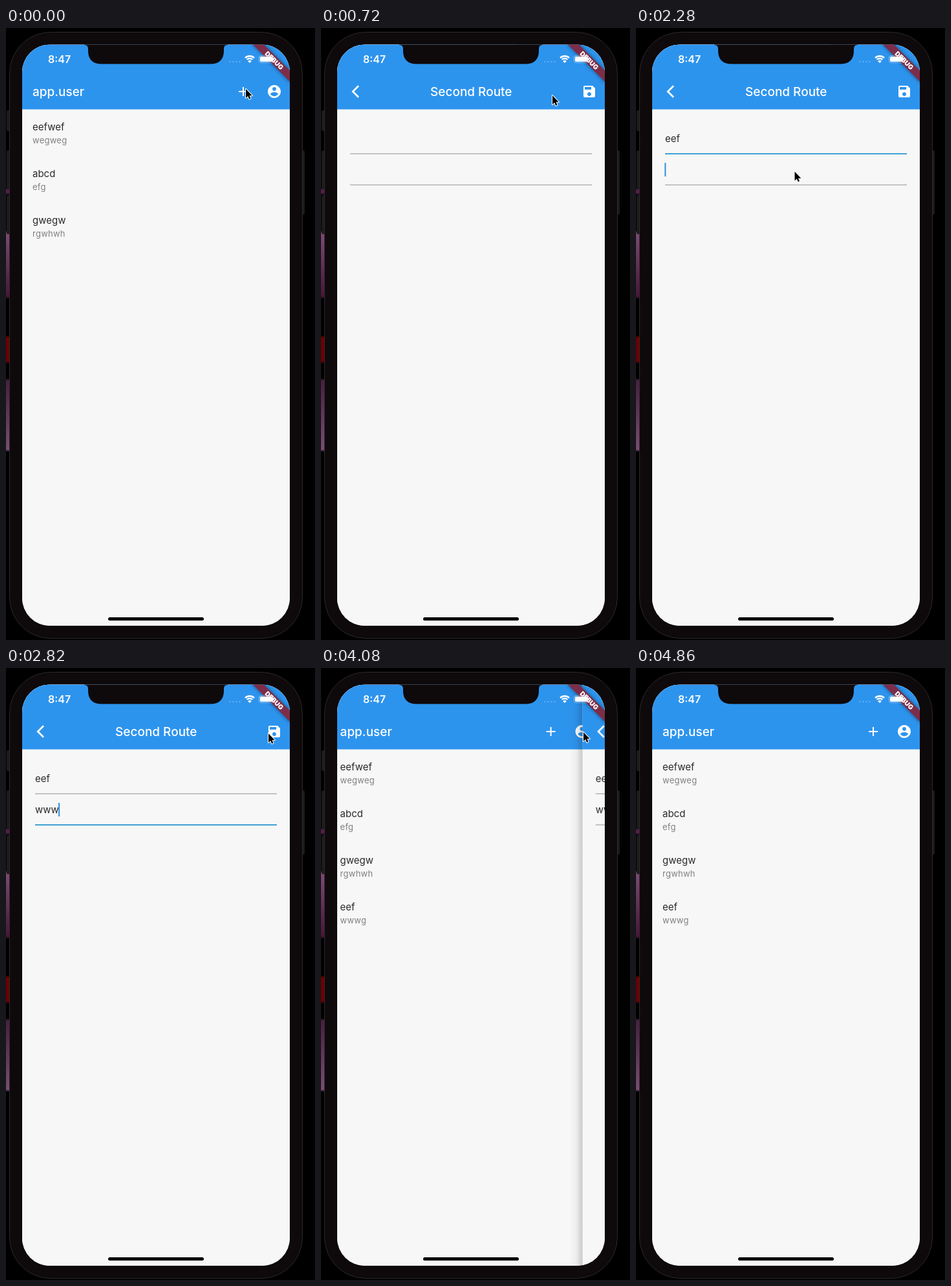
Write an HTML page with a canvas that moves like this. It is 478 px wide and 944 px high and loops after 5.16 s.

```html
<!DOCTYPE html>
<html lang="en">
<head>
<meta charset="utf-8">
<title>Phone list demo</title>
<style>
  html, body { margin: 0; width: 100%; height: 100%; overflow: hidden; background: #000; }
  canvas { display: block; }
</style>
</head>
<body>
<canvas id="stage" width="478" height="944"></canvas>
<script>
const ctx = document.getElementById('stage').getContext('2d');
const LOOP = 5160, STEP = 60;
const SCREEN = { x: 25, y: 25.5, w: 414, h: 896.5 };
const BLUE = '#2d94ee', PAGE = '#f7f7f7', BEZEL = '#0e090b';
const FONT = 'Inter, Roboto, sans-serif';

const ICONS = {
  add: new Path2D('M19 13h-6v6h-2v-6H5v-2h6V5h2v6h6z'),
  account: new Path2D('M12 2C6.48 2 2 6.48 2 12s4.48 10 10 10 10-4.48 10-10S17.52 2 12 2zm0 3c1.66 0 3 1.34 3 3s-1.34 3-3 3-3-1.34-3-3 1.34-3 3-3zm0 14.2c-2.5 0-4.71-1.28-6-3.22.03-1.99 4-3.08 6-3.08 1.99 0 5.97 1.09 6 3.08-1.29 1.94-3.5 3.22-6 3.22z'),
  save: new Path2D('M17 3H5c-1.11 0-2 .9-2 2v14c0 1.1.89 2 2 2h14c1.1 0 2-.9 2-2V7l-4-4zm-5 16c-1.66 0-3-1.34-3-3s1.34-3 3-3 3 1.34 3 3-1.34 3-3 3zm3-10H5V5h10v4z')
};
const ARROW = new Path2D('M0 0V14L3.2 11.1 5.2 15.8 7.5 14.8 5.5 10.2H9.8Z');
const NOTCH = new Path2D('M121 25V26Q127 26 127 32V35Q127 55.5 148 55.5H316Q337 55.5 337 35V32Q337 26 343 26V25Z');

const ROWS = [['eefwef', 'wegweg'], ['abcd', 'efg'], ['gwegw', 'rgwhwh'], ['eef', 'wwwg']];
const FIELDS = [
  { y: 194, text: 'eef', keys: [1380, 1500, 1620], focus: [1200, 2280], caret: [[1200, 2280]] },
  { y: 242, text: 'wwwg', keys: [2460, 2580, 2700, 2880], focus: [2280, 3900], caret: [[2280, 3180], [3420, 3720]] }
];
const PUSH = { at: 30, dur: 420 }, POP = { at: 3900, dur: 364 };
// pointer: time, x, y
const POINTER = [
  [0, 371, 94], [540, 371, 94], [720, 358, 104], [960, 250, 168], [1740, 250, 168],
  [2040, 245.5, 221.5], [2400, 245.5, 221.5], [2760, 406, 101], [2880, 406, 101],
  [2940, 406, 99], [4440, 406, 99], [4860, 392, 948]
];

const clamp = v => Math.max(0, Math.min(1, v));
const progress = (t, at, dur) => clamp((t - at) / dur);
const mix = (a, b, k) => a + (b - a) * k;

function bezier(x1, y1, x2, y2) {
  const curve = (a, b, s) => 3 * a * s * (1 - s) ** 2 + 3 * b * s * s * (1 - s) + s ** 3;
  return x => {
    let lo = 0, hi = 1;
    for (let i = 0; i < 30; i++) {
      const mid = (lo + hi) / 2;
      if (curve(x1, x2, mid) < x) lo = mid; else hi = mid;
    }
    return x <= 0 ? 0 : x >= 1 ? 1 : curve(y1, y2, lo);
  };
}
const easeIn = bezier(.35, .91, .33, .97);
const easeBack = bezier(.67, .03, .65, .09);

function rect(x, y, w, h, color) {
  ctx.fillStyle = color;
  ctx.fillRect(x, y, w, h);
}

function round(x, y, w, h, r, color) {
  ctx.beginPath();
  ctx.roundRect(x, y, w, h, r);
  ctx.fillStyle = color;
  ctx.fill();
}

function text(str, x, y, size, weight, color, spacing = 0) {
  ctx.font = `${weight} ${size}px ${FONT}`;
  ctx.letterSpacing = spacing + 'px';
  ctx.fillStyle = color;
  ctx.fillText(str, x, y);
}

function icon(name, cx, cy) {
  ctx.save();
  ctx.translate(cx - 12, cy - 12);
  ctx.fillStyle = '#fff';
  ctx.fill(ICONS[name]);
  ctx.restore();
}

function glow(y, h, top, bottom) {
  const g = ctx.createLinearGradient(0, y, 0, y + h), edge = 4 / h;
  g.addColorStop(0, '#000');
  g.addColorStop(edge, top);
  g.addColorStop(1 - edge, bottom);
  g.addColorStop(1, '#000');
  rect(0, y, 6, h, g);
}

function drawBody() {
  rect(0, 0, 478, 944, '#000');
  glow(246, 12, '#55204a', '#55204a');
  glow(312, 106, '#7c4a74', '#481638');
  glow(474, 44, '#6c0000', '#6c0000');
  glow(540, 114, '#482040', '#7a4c72');
  for (const [y, h] of [[127, 32], [189, 59], [258, 60]]) round(1, y, 6, h, 2, '#1d1c1d');
  round(457, 189, 5, 99, 2, '#1d1c1d');
  round(5.5, 6.5, 453, 935, 64, BEZEL);
  ctx.strokeStyle = '#2b2a2b';
  ctx.lineWidth = 1;
  ctx.stroke();
}

function drawPage() {
  rect(SCREEN.x, SCREEN.y, SCREEN.w, SCREEN.h, PAGE);
  rect(SCREEN.x, SCREEN.y, SCREEN.w, 100, BLUE);
}

function drawList(shift, count) {
  ctx.save();
  ctx.translate(shift, 0);
  drawPage();
  text('app.user', 41, 105, 19, 500, '#fff');
  icon('add', 367, 98);
  icon('account', 415, 98);
  ROWS.slice(0, count).forEach(([name, note], i) => {
    text(name, 41, 158 + i * 72, 15, 400, '#2a2a2a');
    text(note, 41, 178 + i * 72, 13, 400, '#808080', .25);
  });
  ctx.restore();
}

function drawField(field, t) {
  const [start, end] = field.focus;
  const on = progress(t, start, 180) - progress(t, end, 180);
  const color = [[196, 66], [196, 160], [196, 212]].map(([a, b]) => Math.round(mix(a, b, on)));
  rect(45, field.y - 1, 374, 2, `rgb(${color})`);
  const typed = field.text.slice(0, field.keys.filter(k => k <= t).length);
  text(typed, 45, field.y - 18, 15, 400, '#2a2a2a');
  if (field.caret.some(([a, b]) => t >= a && t < b))
    rect(44.3 + ctx.measureText(typed).width, field.y - 34, 2, 21, '#2d90dc');
}

function drawForm(shift, t) {
  ctx.save();
  ctx.translate(shift, 0);
  if (shift > 0) {
    const g = ctx.createLinearGradient(5, 0, 25, 0);
    g.addColorStop(0, 'rgba(0,0,0,0)');
    g.addColorStop(.5, 'rgba(0,0,0,.04)');
    g.addColorStop(1, 'rgba(0,0,0,.19)');
    rect(5, SCREEN.y, 20, SCREEN.h, g);
  }
  drawPage();
  ctx.strokeStyle = '#fff';
  ctx.lineWidth = 2.7;
  ctx.beginPath();
  ctx.moveTo(58, 89.3);
  ctx.lineTo(49.3, 98);
  ctx.lineTo(58, 106.7);
  ctx.stroke();
  text('Second Route', 169, 105, 19, 500, '#fff');
  icon('save', 415, 98);
  FIELDS.forEach(f => drawField(f, t));
  ctx.restore();
}

function drawBanner() {
  ctx.save();
  ctx.translate(439, 26);
  ctx.rotate(Math.PI / 4);
  ctx.shadowColor = 'rgba(0,0,0,.5)';
  ctx.shadowBlur = 6;
  rect(-42, 28, 84, 12, '#7c2d4a');
  ctx.shadowBlur = 0;
  ctx.textAlign = 'center';
  text('DEBUG', 0, 37.7, 10.2, 900, '#fff');
  ctx.restore();
}

function drawStatus() {
  text('8:47', 65, 54, 16, 600, '#fff');
  for (let i = 0; i < 4; i++) round(345.5 + i * 5, 51, 2, 2, 1, 'rgba(255,255,255,.35)');
  ctx.strokeStyle = '#fff';
  ctx.lineWidth = 2.4;
  for (const r of [6, 9.8]) {
    ctx.beginPath();
    ctx.arc(377, 53, r, -Math.PI * .75, -Math.PI * .25);
    ctx.stroke();
  }
  ctx.beginPath();
  ctx.moveTo(377, 54);
  ctx.arc(377, 54, 4, -Math.PI * .75, -Math.PI * .25);
  ctx.fillStyle = '#fff';
  ctx.fill();
  ctx.beginPath();
  ctx.roundRect(391.5, 42.5, 23, 11, 3);
  ctx.strokeStyle = 'rgba(255,255,255,.4)';
  ctx.lineWidth = 1;
  ctx.stroke();
  round(393, 44, 20, 8, 1.8, '#fff');
}

function drawPointer(t) {
  const next = POINTER.findIndex(p => p[0] > t);
  if (next < 1) return;
  const [t0, x0, y0] = POINTER[next - 1], [t1, x1, y1] = POINTER[next];
  const k = (t - t0) / (t1 - t0), s = k * k * (3 - 2 * k);
  ctx.save();
  ctx.translate(mix(x0, x1, s), mix(y0, y1, s));
  ctx.lineJoin = 'round';
  ctx.lineWidth = 2;
  ctx.strokeStyle = '#fff';
  ctx.fillStyle = '#000';
  ctx.stroke(ARROW);
  ctx.fill(ARROW);
  ctx.restore();
}

function draw(t) {
  const open = t < POP.at
    ? easeIn(progress(t, PUSH.at, PUSH.dur))
    : easeBack(1 - progress(t, POP.at, POP.dur));
  drawBody();
  ctx.save();
  ctx.beginPath();
  ctx.roundRect(SCREEN.x, SCREEN.y, SCREEN.w, SCREEN.h, 43);
  ctx.clip();
  rect(SCREEN.x, SCREEN.y, SCREEN.w, SCREEN.h, PAGE);
  drawList(-open * SCREEN.w / 3, t < POP.at ? 3 : 4);
  if (open > 0) drawForm((1 - open) * SCREEN.w, t);
  drawBanner();
  drawStatus();
  round(158, 909, 148, 5, 2.5, '#000');
  ctx.fillStyle = BEZEL;
  ctx.fill(NOTCH);
  ctx.restore();
  drawPointer(t);
}

const began = performance.now();
function tick() {
  const t = (performance.now() - began) % LOOP;
  draw(Math.floor(t / STEP) * STEP);
  requestAnimationFrame(tick);
}
tick();
</script>
</body>
</html>
```
